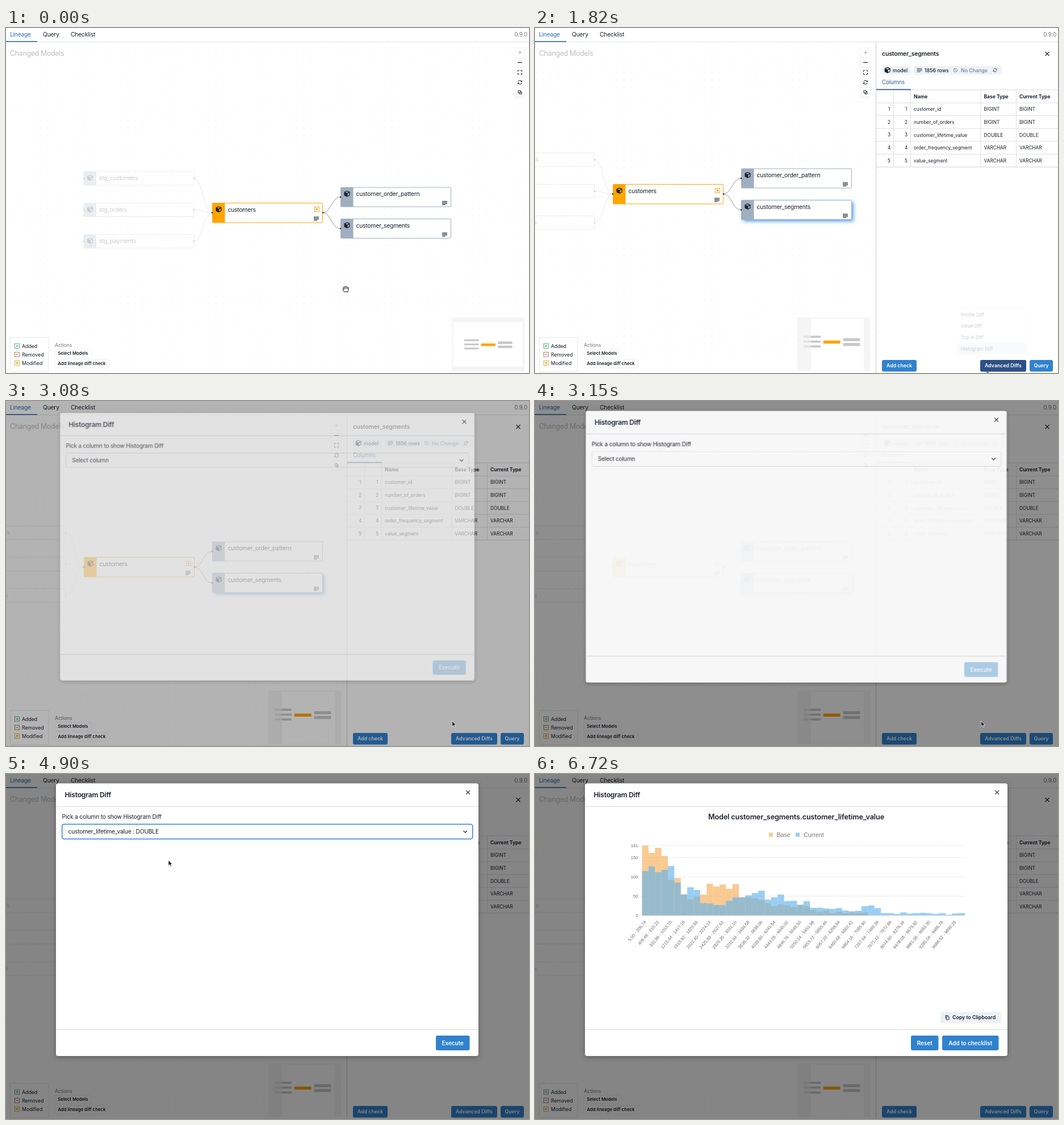
An HTML page for the animation above (8000 ms loop, 921 by 608 pixels).

```html
<!DOCTYPE html>
<html lang="en">
<head>
<meta charset="utf-8">
<title>Lineage histogram diff</title>
<style>
html, body { margin: 0; width: 100%; height: 100%; overflow: hidden; background: #fff; }
svg { display: block; width: 921px; height: 608px; font-family: Inter, "Open Sans", sans-serif; }
text { white-space: pre; }
.chart { font-family: "Liberation Sans", Arial, sans-serif; }
.graph, .controls { animation: 8s step-end infinite; }
.graph { animation-name: graph; }
.controls { animation-name: controls; }
.popup { transform-origin: 865px 578px; animation: popup 8s linear infinite; }
.dim { animation: dim 8s cubic-bezier(0, 0, .2, 1) infinite; }
.modal { transform-origin: 460px 257px; animation: modal 8s cubic-bezier(0, 0, .2, 1) infinite; }
.cursor { animation: cursor 8s ease-in-out infinite; }
.glow { filter: drop-shadow(3px 3px 3px #4f9be8); }
.shadow { filter: drop-shadow(0 2px 4px rgba(0, 0, 0, .3)); }
@keyframes graph { 0% { transform: none } 12.5%, 100% { transform: translate(-226px, -33px) } }
@keyframes controls { 0% { transform: none } 12.5%, 100% { transform: translateX(-323px) } }
@keyframes popup {
  0%, 21.8% { opacity: 0; transform: scale(.8) }
  22.75% { opacity: .35; transform: scale(.923) }
  24.2%, 37.7% { opacity: 1; transform: none }
  37.8%, 100% { opacity: 0; transform: none }
}
@keyframes dim { 0%, 37.85% { opacity: 0 } 40.2%, 100% { opacity: 1 } }
@keyframes modal {
  0%, 37.85% { opacity: 0; transform: scale(.95) }
  40.2%, 100% { opacity: 1; transform: none }
}
@keyframes cursor {
  0%, 1% { transform: translate(598px, 460px) }
  9%, 13% { transform: translate(690px, 352px) }
  20.5%, 24% { transform: translate(797px, 605.5px) }
  31% { transform: translate(790px, 548px) }
  35%, 41% { transform: translate(785.5px, 564px) }
  49.5%, 51% { transform: translate(268px, 101px) }
  53.4% { transform: translate(269.5px, 128.5px) }
  56.5%, 64% { transform: translate(286px, 152px); animation-timing-function: ease-in }
  69.1% { transform: translate(417px, 267px); animation-timing-function: ease-out }
  73.5%, 77% { transform: translate(786px, 473px) }
  83%, 83.4% { transform: translate(469px, 608px) }
  83.5%, 100% { transform: translate(469px, 640px) }
}
</style>
</head>
<body>
<svg id="stage" viewBox="0 0 921 608"></svg>
<script>
// Hard switches: class name -> [shown from, hidden at] in ms
const LOOP = 8000;
const windows = {
  closed: [0, 1000], opened: [1000, LOOP], pressed: [1750, 3020],
  unfocused: [0, 4040], focused: [4040, LOOP], dropdown: [4060, 4870],
  first: [4060, 4330], second: [4330, 4450], third: [4450, 4870],
  empty: [0, 4870], picked: [4870, LOOP], form: [0, 6090], result: [6090, LOOP],
  grab: [0, 620], arrow: [1000, 1620], arrowAgain: [1900, 5800],
  finger: [620, 1000], fingerMenu: [1620, 1900], fingerRun: [5800, 6200], arrowOut: [6200, LOOP]
};
const pct = ms => ms / LOOP * 100 + '%';
const sheet = document.createElement('style');
sheet.textContent = Object.entries(windows).map(([name, [from, to]]) =>
  `.${name}{animation:${name} ${LOOP}ms step-end infinite}
   @keyframes ${name}{0%{opacity:0}${pct(from)}{opacity:1}${pct(to)}{opacity:${to === LOOP ? 1 : 0}}}`).join('\n');
document.head.append(sheet);

const INK = '#1a202c', BLUE = '#3182ce', NAVY = '#2c4f85', ORANGE = '#ffa500', SLATE = '#a0aec0';
const group = (cls, ...parts) => `<g class="${cls}">${parts.join('')}</g>`;
const at = (x, y, body, extra = '') => `<g transform="translate(${x} ${y})" ${extra}>${body}</g>`;
const rect = (x, y, w, h, fill, extra = '') =>
  `<rect x="${x}" y="${y}" width="${w}" height="${h}" fill="${fill}" ${extra}/>`;
const stroke = (d, color = INK, width = 1, extra = '') =>
  `<path d="${d}" fill="none" stroke="${color}" stroke-width="${width}" ${extra}/>`;
// y is the middle of the capitals
const text = (x, y, str, size, { fill = INK, weight = 400, anchor = 'start', track = -.02 } = {}) =>
  `<text x="${x}" y="${y + size * .36}" font-size="${size}" font-weight="${weight}" fill="${fill}" text-anchor="${anchor}" letter-spacing="${track}em">${str}</text>`;
const button = (x, y, w, h, label, size, fill = BLUE) =>
  rect(x, y, w, h, fill, 'rx="3"') +
  text(x + w / 2, y + h / 2, label, size, { fill: '#fff', weight: 600, anchor: 'middle', track: 0 });

const cube = (x, y, hole) => at(x, y,
  `<path d="M0-5.2L5-3.2V3L0 5.4L-5 3V-3.2Z" fill="${INK}"/>
   <path d="M0-3.9L3.2-2.6L0-1.3L-3.2-2.6ZM.9 0L3.8-1.2V2.3L.9 3.8Z" fill="${hole}"/>`);
const rowsIcon = (x, y, color = INK) => stroke(`M${x} ${y}h9m-9 2h9m-9 2h9m-9 2h6`, color, 1);
const close = (x, y) => stroke(`M${x - 3.5} ${y - 3.5}l7 7m0-7l-7 7`, INK, 1.1);
const statusIcon = (x, y, color, mark) =>
  rect(x - 4, y - 4, 8, 8, '#fff', `stroke="${color}" stroke-width=".9"`) +
  (mark ? stroke(mark, color, 1, `transform="translate(${x} ${y})"`) : `<circle cx="${x}" cy="${y}" r="1.7" fill="${color}"/>`);

// Lineage graph
const edge = (x1, y1, x2, y2, color) => {
  const mid = (x1 + x2) / 2;
  return stroke(`M${x1} ${y1}C${mid} ${y1} ${mid} ${y2} ${x2} ${y2}`, color, .8);
};
const dot = (x, y) => `<circle cx="${x}" cy="${y}" r="1.2" fill="#222"/>`;
const node = (x, y, h, label, color, extra = '') =>
  rect(x, y, 194, h, '#fff', `stroke="${color}" rx="1.5" ${extra}`) + rect(x, y, 22, h, color) +
  cube(x + 11, y + 11, color) + text(x + 27, y + 11.5, label, 10.4, { track: -.025 }) +
  (h > 30 ? rowsIcon(x + 178.5, y + 24.5) : '');
const sources = ['stg_customers', 'stg_orders', 'stg_payments'].map((label, i) => {
  const y = 253 + i * 55.5;
  return edge(331, y + 12, 363, 325.5, '#e2e2e2') +
    `<g opacity="${.22}">${node(137, y, 24, label, SLATE)}${dot(137, y + 12)}${dot(331, y + 12)}</g>`;
}).join('');
const graph = group('graph',
  rect(-20, -20, 1200, 700, 'url(#dots)'),
  sources,
  edge(557, 325.5, 589, 298, '#777'), edge(557, 325.5, 589, 353.5, '#777'),
  node(363.5, 308.5, 34.5, 'customers', ORANGE), statusIcon(547.3, 319.5, '#e8a020'),
  node(589.5, 281, 34, 'customer_order_pattern', SLATE),
  group('opened', rect(589.5, 336.5, 194, 34, '#fff', 'class="glow"')),
  node(589.5, 336.5, 34, 'customer_segments', SLATE),
  dot(363, 325.5), dot(558, 325.5), dot(589, 298), dot(589, 353.5));

const controlIcons = ['M-3.5 0H3.5M0-3.5V3.5', 'M-4 0H4',
  'M-3.5-1V-3.5H-1M1-3.5H3.5V-1M3.5 1V3.5H1M-1 3.5H-3.5V1',
  'M-3.2-.8A3.2 3.2 0 0 1 3-1.2M3.4-3.2V-1H1.2M3.2 .8A3.2 3.2 0 0 1-3 1.2M-3.4 3.2V1H-1.2',
  'M-3-3H1V1H-3ZM1-1H3V3H-1V1'];
const controls = group('controls', rect(896, 35, 18, 87, '#fff', 'stroke="#f3f3f3"'),
  ...controlIcons.map((d, i) => at(905, 43.2 + i * 17.5,
    stroke(d, i ? INK : '#aaa', i === 1 ? 1.3 : 1) + stroke('M-9 8.7H9', '#eee'))));

// Minimap: nodes keep their layout, only scale and viewport differ
const minimap = (cls, x, [vx, vy, vw, vh], mx, my, k) => {
  const bar = (bx, by, h, color) => rect(mx + bx * k, my + by * k, 194 * k, h * k, color);
  return group(cls, rect(x, 510, 128.5, 95, '#fff'),
    [0, 55.5, 111].map(y => bar(0, y, 24, '#c8c8c8')).join(''),
    bar(226, 55.5, 34.5, ORANGE), bar(452, 28, 34, '#c8c8c8'), bar(452, 83.5, 34, '#c8c8c8'),
    `<path d="M${x} 510h128.5v95h-128.5ZM${vx} ${vy}v${vh}h${vw}v${-vh}Z" fill="#f0f0f0" fill-opacity=".65"/>`,
    rect(x, 510, 128.5, 95, 'none'));
};

const legend = rect(7.5, 545.5, 67.5, 60, '#fff', 'stroke="#e8e8e8"') +
  [['Added', '#48a868', 'M-2 0H2M0-2V2'], ['Removed', '#a0705a', 'M-2 0H2'], ['Modified', '#e8a020', '']]
    .map(([label, color, mark], i) => statusIcon(19.5, 560.3 + i * 15, color, mark) +
      text(28, 560.3 + i * 15, label, 8.9, { track: -.01 })).join('');
const actions = text(86, 558.5, 'Actions', 8.7, { fill: '#777', track: -.01 }) +
  [['Select Models', 65, 573.5], ['Add lineage diff check', 96, 591.5]].map(([label, w, y]) =>
    rect(86, y - 7.5, w, 15, '#fff', 'rx="3" stroke="#eee"') +
    text(91.3, y, label, 7.8, { weight: 600, track: 0 })).join('');

const header = rect(0, 0, 921, 24.5, '#fff') + stroke('M0 24.5H921', '#dfe3e8') +
  rect(0, 23, 55, 1.6, '#2b6cb0') + text(7, 11, 'Lineage', 10.3, { fill: '#2b6cb0', track: -.025 }) +
  text(65, 11, 'Query', 10.3) + text(114, 11, 'Checklist', 10.3) +
  text(918, 11, '0.9.0', 10, { fill: '#777', anchor: 'end' });

// Side panel
const columns = [['customer_id', 'BIGINT'], ['number_of_orders', 'BIGINT'], ['customer_lifetime_value', 'DOUBLE'],
  ['order_frequency_segment', 'VARCHAR'], ['value_segment', 'VARCHAR']];
const rowY = i => 143.3 + i * 22.6;
const small = { track: 0 }, head = { weight: 700, track: 0 };
const table = stroke('M601 109H921', '#d5dde6') +
  stroke('M631.5 109V245M661.5 109V245M785 109V245M847.5 109V245', '#dcdcdc', .9) +
  text(667, 121, 'Name', 8.5, head) + text(790.5, 121, 'Base Type', 8.5, head) + text(853, 121, 'Current Type', 8.5, head) +
  columns.map(([name, type], i) =>
    stroke(`M601 ${rowY(i) - 11.3}H921`, '#dcdcdc', .9) +
    text(623.5, rowY(i), i + 1, 8.3, { anchor: 'middle' }) + text(653.5, rowY(i), i + 1, 8.3, { anchor: 'middle' }) +
    text(667, rowY(i), name, 8.35, small) + text(790.5, rowY(i), type, 8.35, small) + text(853, rowY(i), type, 8.35, small)
  ).join('') + stroke('M601 245H921', '#cfcfcf', .9);
const panel = group('opened',
  rect(600, 25, 321, 583, '#fff'), stroke('M600.5 25V608', '#ccc'),
  text(611, 45.5, 'customer_segments', 10.6, { weight: 600 }), close(902, 45.5),
  rect(611, 67, 50.5, 15, '#edf2f7', 'rx="3.5"'), cube(620.7, 74.3, '#edf2f7'),
  text(630, 74.5, 'model', 8.9, { weight: 500, track: 0 }),
  rect(667, 67, 155, 15, '#edf2f7', 'rx="3.5"'), rowsIcon(672.5, 71.3, '#555'),
  text(686, 74.5, '1856 rows', 8.8, { weight: 500, track: 0 }),
  '<circle cx="740.3" cy="74.3" r="3.2" fill="none" stroke="#718096" stroke-width=".9"/>', stroke('M738 72l4.6 4.6', '#718096', .9),
  text(750, 74.5, 'No Change', 8.8, { fill: '#718096', weight: 500, track: 0 }),
  at(810, 74.3, stroke(controlIcons[3], INK, .9, 'transform="scale(.85)"')),
  text(611, 95.3, 'Columns', 9.8, { fill: '#2b5c94', track: -.01 }),
  table, rect(601, 107.6, 61, 1.6, '#2c5282'),
  button(611, 585, 61, 20.5, 'Add check', 8.75), button(784, 585, 81, 20.5, 'Advanced Diffs', 8.75),
  group('pressed', button(784, 585, 81, 20.5, 'Advanced Diffs', 8.75, NAVY)),
  button(871, 585, 41, 20.5, 'Query', 8.75));
const popup = group('popup',
  rect(733, 485, 132, 93, '#fff', 'rx="3" stroke="#f3f4f6"'), rect(733, 553.5, 132, 21, '#edf0f4'),
  ...['Profile Diff', 'Value Diff', 'Top-K Diff', 'Histogram Diff'].map((label, i) =>
    text(740, 499.5 + i * 21.6, label, 9.2, { fill: '#777', track: -.01 })));

// Modal: form
const options = ['Select column', 'customer_id : BIGINT', 'number_of_orders : BIGINT', 'customer_lifetime_value : DOUBLE'];
const optionY = i => 102 + i * 16.9;
const selectBox = (cls, color, width) =>
  group(cls, rect(98.7, 88.5, 723, 26, '#fff', `rx="3.5" stroke="${color}" stroke-width="${width}"`));
const form = group('form',
  text(98.5, 75.7, 'Pick a column to show Histogram Diff', 10.4, { track: -.022 }),
  selectBox('unfocused', '#dde3ea', 1), selectBox('focused', BLUE, 1.5),
  group('empty', text(109.5, 101.5, options[0], 10.2)), group('picked', text(109.5, 101.5, options[3], 10.3, { track: -.022 })),
  stroke('M805.5 100l3.2 3.2l3.2-3.2', INK, 1.2),
  group('empty', button(757, 461, 59.5, 26, 'Execute', 9.9, '#add0ec')),
  group('picked', button(757, 461, 59.5, 26, 'Execute', 9.9)),
  group('dropdown',
    rect(93, 90.5, 724, 74.5, '#e6e6e6', 'rx="5" class="shadow"'),
    stroke('M100 102.7l1.7 2.4l3.6-5.4', INK, 1.1),
    ...options.map((label, i) => text(108, optionY(i), label, 10.3, { track: -.022 })),
    ...['first', 'second', 'third'].map((cls, i) => group(cls,
      rect(97, optionY(i + 1) - 8.2, 716, 16.8, '#519ffb', 'rx="2"'),
      text(108, optionY(i + 1), options[i + 1], 10.3, { fill: '#fff', track: -.022 })))));

// Modal: histogram
const base = [181, 162, 175, 154, 92, 97, 55, 42, 49, 54, 82, 75, 80, 69, 81, 47, 47, 45, 40, 32, 24, 29, 26, 22, 27, 24, 14, 10, 13, 6, 10, 6, 8, 7, 8];
const current = [115, 127, 112, 118, 128, 85, 54, 73, 66, 32, 31, 27, 27, 38, 47, 47, 52, 58, 64, 41, 47, 54, 37, 38, 28, 37, 20, 20, 18, 17, 19, 13, 11, 12, 24, 26, 19, 6, 6, 4, 8, 5, 6, 7, 6, 4, 6, 2, 5, 6];
const LEFT = 188.5, BIN = 11.37, yOf = v => 249.3 - v * .681;
const bars = (values, color) => values.map((v, i) =>
  rect(LEFT + i * BIN, yOf(v), BIN, v * .681, color, 'fill-opacity=".647"')).join('');
const binEdge = i => (5 + 201.74 * i).toFixed(2);
const tick = { fill: '#666', anchor: 'end', track: 0 };
const gridLines = [0, 50, 100, 150, 181].map(v =>
  stroke(`M183 ${yOf(v)}H757`, '#d6d6d6', .9, 'stroke-dasharray="1.4 1.4"') + text(181.5, yOf(v), v, 7.6, tick)).join('');
const binLabels = Array.from({ length: 25 }, (_, k) => 2 * k).map(i =>
  `<g transform="translate(${LEFT + (i + .5) * BIN} 259.5) rotate(-50)">${text(0, 0, `${binEdge(i)} - ${binEdge(i + 1)}`, 7.6, tick)}</g>`).join('');
const legendLabel = { fill: '#777', track: 0 };
const result = group('result',
  text(460, 75.7, 'Model customer_segments.customer_lifetime_value', 12.6, { weight: 600, anchor: 'middle', track: -.01 }),
  group('chart',
    rect(412, 103.5, 7, 7, '#f9c990'), text(425.5, 107, 'Base', 10.6, legendLabel),
    rect(459, 103.5, 7, 7, '#9acdf3'), text(473, 107, 'Current', 10.7, legendLabel),
    gridLines, bars(base, '#f6ad55'), bars(current, '#63b3ed'), binLabels),
  rect(714, 419, 107, 20.5, '#edf2f7', 'rx="3"'),
  at(726.3, 429.3, stroke('M-1.8-2.2H2.8V3.6H-1.8ZM-3.2 1.8V-3.8H1.2', INK, .9)),
  text(735, 429.3, 'Copy to Clipboard', 8.75, { weight: 600, track: 0 }),
  button(662, 461, 48.5, 26, 'Reset', 9.9), button(717, 461, 99.5, 26, 'Add to checklist', 9.9));
const modal = group('modal',
  rect(88, 16.5, 744, 480.5, '#fff', 'rx="4" class="shadow"'),
  stroke('M88 57.3H832M88 450.3H832', '#d9d9d9'),
  text(103.5, 37, 'Histogram Diff', 12.2, { weight: 600 }), close(813.7, 32.3),
  form, result);

// Pointer shapes, hot spot at the origin
const outlined = (d, fill, line, width) => `<path d="${d}" fill="${fill}" stroke="${line}" stroke-width="${width}" stroke-linejoin="round"/>`;
const arrowShape = outlined('M0 0V9.6L2.2 7.6L3.8 11L5.4 10.3L3.9 7H6.8Z', '#111', '#fff', .8);
const fingerShape = outlined('M-1 .5Q0-.8 1 .5V4L5 5Q6 5.4 5.6 7L4.6 11H-1.4L-4 7Q-4 5.6-2.6 6.2L-1 7.4Z', '#fff', '#111', .9);
const grabShape = outlined('M-2.6 5L-5 .6Q-5.2-1-3.6-.4L-2.8 .6L-3.6-3Q-3-4.6-2-3.2L-1.2-4.4Q-.2-5.4 .5-4.2Q1.8-5 2.3-3.6Q3.8-4.2 4.2-2.6Q5.6-2.6 5.2-.8L4 5Z', '#fff', '#111', 1) +
  stroke('M-2-3L-1.2-.2M.5-4V-.4M2.3-3.4L2-.2M4.2-2.4L3.7 0', '#111', .8);
const cursor = group('cursor', group('grab', grabShape),
  ...['finger', 'fingerMenu', 'fingerRun'].map(cls => group(cls, fingerShape)),
  ...['arrow', 'arrowAgain', 'arrowOut'].map(cls => group(cls, arrowShape)));

document.getElementById('stage').innerHTML =
  `<defs><pattern id="dots" x="137" y="253" width="12.9" height="12.9" patternUnits="userSpaceOnUse">
    <circle cx=".6" cy=".6" r=".55" fill="#dedede"/></pattern></defs>` +
  rect(0, 0, 921, 608, '#fff') + graph + text(7, 44.7, 'Changed Models', 12.4, { fill: '#bdbdbd', track: -.025 }) +
  controls + minimap('closed', 785, [787.5, 518, 122.5, 79], 807, 548.7, .131) +
  minimap('opened', 462, [486, 512, 93, 92], 473, 542.3, .154) +
  legend + actions + header + panel + popup +
  group('dim', rect(0, 0, 921, 608, 'rgba(0,0,0,.48)')) + modal + cursor;
</script>
</body>
</html>
```
